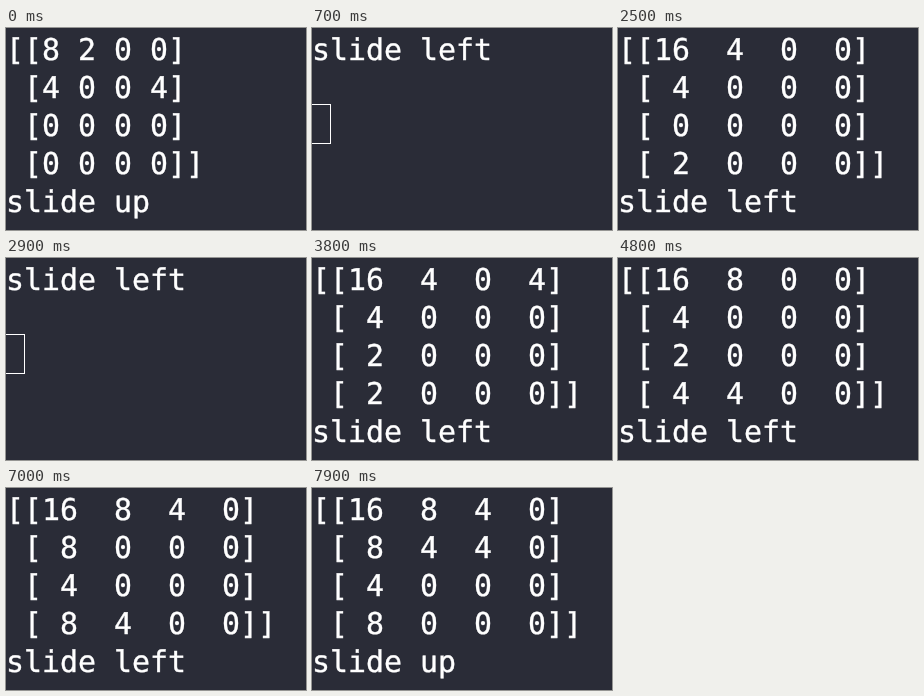
An HTML page for the animation above (8 s loop, 300x202 px).

```html
<!DOCTYPE html>
<html lang="en">
<head>
<meta charset="utf-8">
<title>Sliding tiles in a terminal</title>
<style>
  html, body { margin: 0; width: 100%; height: 100%; overflow: hidden; background: #2a2c37; }
  svg { display: block; width: 100vw; height: 100vh; }
  text {
    font: 29.9px "DejaVu Sans Mono", monospace;
    fill: #fff; stroke: #fff; stroke-width: 0.4px;
    white-space: pre; text-rendering: geometricPrecision;
  }
</style>
</head>
<body>
<svg viewBox="0 0 300 202">
  <rect width="300" height="202" fill="#2a2c37"/>
  <g id="lines"></g>
  <rect id="cursor" x="-5.5" y="76.5" width="24" height="39" fill="none" stroke="#fff"/>
</svg>
<script>
const LOOP = 8000, ROWS = 5, LINE = 38, BASELINE = 31.6;
const START = [[8, 2, 0, 0], [4, 0, 0, 4], [0, 0, 0, 0], [0, 0, 0, 0]];

// time, move, then the new tile's row, column and value; a blocked move clears the screen
const MOVES = [
  [200, 'left', 2, 0, 2],
  [700, 'blocked'],
  [1100, 'up', 2, 0, 2],
  [1600, 'blocked'],
  [2000, 'up', 0, 3, 2],
  [2500, 'left', 3, 0, 2],
  [2900, 'blocked'],
  [3400, 'up', 3, 2, 2],
  [3800, 'left', 0, 3, 4],
  [4300, 'left', 3, 1, 2],
  [4800, 'left', 3, 1, 4],
  [5200, 'left', 0, 3, 2],
  [5600, 'left', 1, 3, 4],
  [6100, 'left', 0, 3, 2],
  [6500, 'left', 2, 2, 2],
  [7000, 'left', 3, 1, 4],
  [7400, 'blocked'],
  [7900, 'up', 1, 2, 4],
];

const transpose = board => board[0].map((_, c) => board.map(row => row[c]));

function slideRow(row) {
  const tiles = row.filter(Boolean);
  for (let i = 0; i < tiles.length - 1; i++) {
    if (tiles[i] === tiles[i + 1]) tiles[i] += tiles.splice(i + 1, 1)[0];
  }
  return [...tiles, 0, 0, 0, 0].slice(0, 4);
}

const slide = (board, move) => move === 'up'
  ? transpose(transpose(board).map(slideRow))
  : board.map(slideRow);

function printBoard(board, move) {
  const width = String(Math.max(...board.flat())).length;
  const rows = board.map((row, i) =>
    (i ? ' [' : '[[') +
    row.map(n => String(n).padStart(width)).join(' ') +
    (i === 3 ? ']]' : ']'));
  return [...rows, 'slide ' + move];
}

function buildScreens() {
  let board = START;
  const screens = [{ time: 0, lines: printBoard(board, 'up') }];
  for (const [time, move, row, col, value] of MOVES) {
    if (move === 'blocked') {
      screens.push({ time, lines: ['slide left'], cursor: true });
      continue;
    }
    board = slide(board, move);
    board[row][col] = value;
    screens.push({ time, lines: printBoard(board, move) });
  }
  return screens;
}

const screens = buildScreens();
const cursor = document.getElementById('cursor');
const lines = Array.from({ length: ROWS }, (_, i) => {
  const line = document.createElementNS('http://www.w3.org/2000/svg', 'text');
  line.setAttribute('x', 0);
  line.setAttribute('y', BASELINE + i * LINE);
  return document.getElementById('lines').appendChild(line);
});

let shown;
function render(time) {
  const screen = screens.filter(s => s.time <= time).pop();
  if (screen === shown) return;
  shown = screen;
  lines.forEach((line, i) => { line.textContent = screen.lines[i] || ''; });
  cursor.setAttribute('visibility', screen.cursor ? 'visible' : 'hidden');
}

const begin = performance.now();
function tick() {
  render((performance.now() - begin) % LOOP);
  requestAnimationFrame(tick);
}
tick();
</script>
</body>
</html>
```
